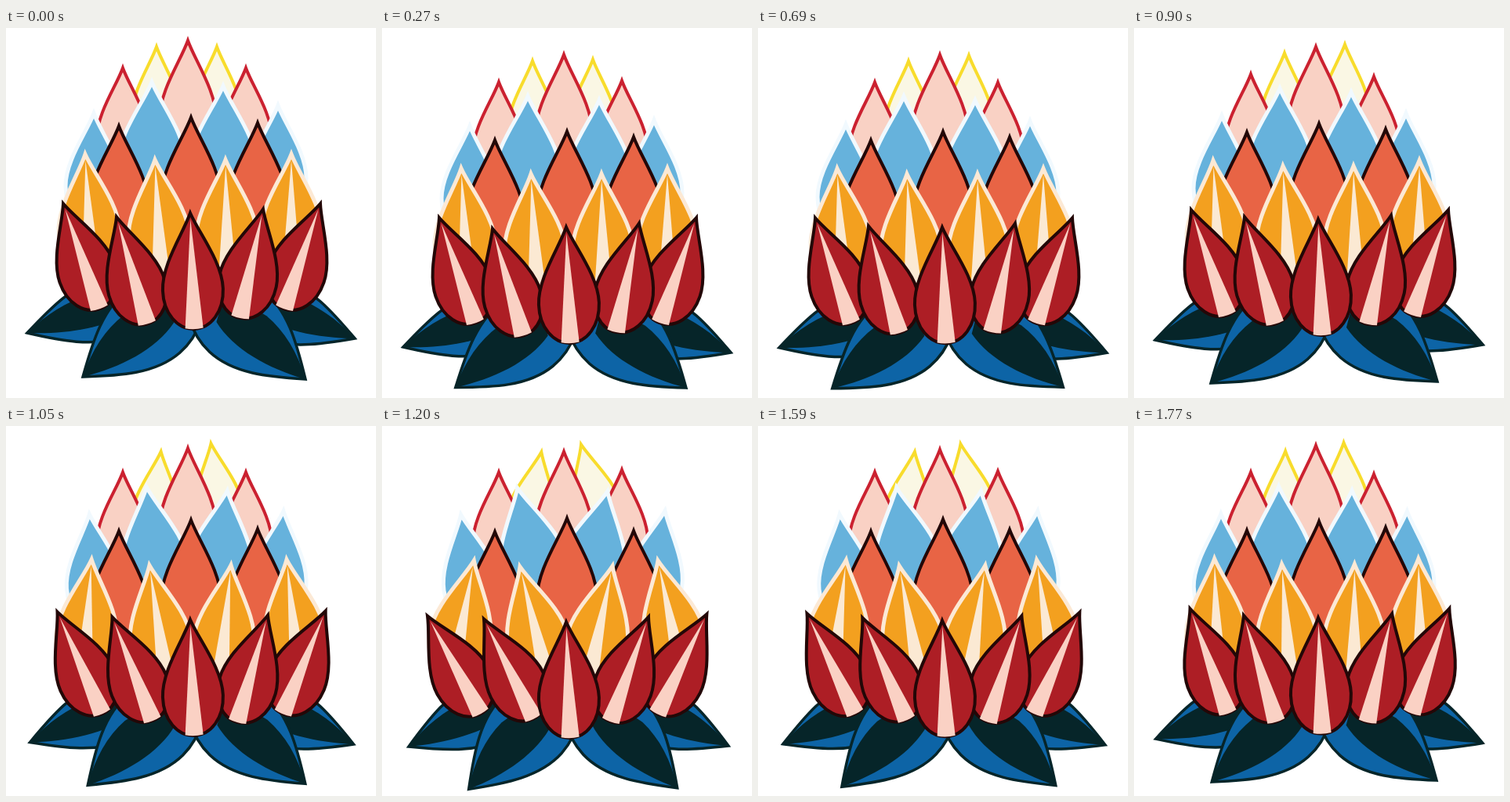
Animation of 472 by 472 pixels, one loop 1.8 s. Source, as an HTML page with a canvas:

```html
<!DOCTYPE html>
<html lang="en">
<head>
<meta charset="utf-8">
<title>Opening flower</title>
<style>
  html, body { margin: 0; width: 100%; height: 100%; overflow: hidden; background: #fff; }
  canvas { display: block; width: 100vw; height: 100vh; }
</style>
</head>
<body>
<canvas id="stage" width="472" height="472"></canvas>
<script>
const ctx = document.getElementById('stage').getContext('2d');
const LOOP = 1800, STEP = 30, LEG = 450;
const DARK = '#062529', BLUE = '#0d64a6', INK = '#230707';

// Poses are [x, y, lean]: raised, sunk, resting, open.
// By default a part sinks 30 px and comes to rest 8 px below its start.
const poses = (x, y, lean, openX, openY, openLean, sink = 30, rest = 8) => [
  [x, y, lean], [x, y + sink, lean], [x, y + rest, lean], [openX, openY, openLean]
];

const leaves = [
  { wide: 0.78, side: 1, keys: poses(27, 389, 17, 37.5, 414.5, 27.5, 30, 9) },
  { wide: 0.78, side: -1, keys: poses(445, 396, 20, 440.5, 410, 25) },
  { wide: 1, side: 1, keys: [[98, 445, 38], [91, 467.5, 35.5], [98, 453, 38], [117, 468.5, 49]] },
  { wide: 1, side: -1, keys: [[382, 448, 40], [392, 466.5, 37], [387, 451, 38], [371.5, 467, 46.5]] }
];

const row = (fill, line, weight, w, l, petals, shine) =>
  ({ fill, line, weight, w, l, shine, petals });

const rows = [
  row('#faf7e4', '#f8dc2c', 4, 31, 130, [
    poses(192, 24, 0, 209, 34, -14),
    poses(269, 24, 0, 246.5, 25, 21, 27, -3)
  ]),
  row('#f9d1c4', '#cb2130', 4, 33, 135, [
    poses(149, 51, 0, 149, 59, 0),
    poses(306, 51, 0, 306, 53, 0, 27, 11)
  ]),
  row('#f9d1c4', '#cb2130', 4, 36, 150, [
    poses(232, 16, 0, 232, 37, 0)
  ]),
  row('#66b2dc', '#f1f9fe', 5, 36, 140, [
    poses(112, 109, 0, 95, 114, 13, 27, 3),
    poses(347, 99, 0, 368, 108, -13, 31, 10)
  ]),
  row('#66b2dc', '#f1f9fe', 5, 43, 155, [
    poses(186, 69, 0, 166, 80, 18),
    poses(277, 74, 0, 293, 84, -17)
  ]),
  row('#e86445', INK, 4, 38, 153, [
    poses(144, 125, 0, 144, 136, 0),
    poses(321, 121, 0, 321, 136, 0),
    poses(236, 114, 0, 236, 115.5, 0)
  ]),
  row('#f3a01f', '#fce9d5', 5, 39, 150, [
    poses(101, 161, 3, 125.5, 173, -17),
    poses(364, 161, 0, 346, 173, 18),
    poses(190, 168, 3, 169, 181, 19),
    poses(280, 168, 1, 301, 180, -18)
  ], '#fbe9d3'),
  row('#ad1e25', INK, 4, 37, 142, [
    poses(73, 224, 19, 50.5, 247.5, 33.5),
    poses(401, 224, -19, 421, 244, -30),
    poses(141, 241, 16, 124.5, 249, 32, 25, 0),
    poses(328, 231, -12, 346, 246, -24)
  ], '#fad1c4'),
  row('#ad1e25', INK, 4, 38.5, 148, [
    poses(235, 236, 2, 235, 253, 2)
  ], '#fad1c4')
];

function poseAt(keys, t) {
  const leg = Math.floor(t / LEG), k = t / LEG - leg;
  const from = keys[leg], to = keys[leg === 3 ? 2 : leg + 1];
  return from.map((v, i) => v + (to[i] - v) * k);
}

function place([x, y, lean], side = 1) {
  ctx.save();
  ctx.translate(x, y);
  ctx.scale(side, 1);
  ctx.rotate(-lean * Math.PI / 180);
}

function drawLeaf({ wide, side, keys }, t) {
  place(poseAt(keys, t), side);
  ctx.save();
  ctx.scale(1, wide);
  const body = new Path2D(
    'M0 0C38-28 75-54 116-52C150-50 180-30 190 0C180 30 150 50 116 52C75 54 38 28 0 0Z');
  ctx.fillStyle = BLUE;
  ctx.fill(body);
  ctx.fillStyle = DARK;
  ctx.fill(new Path2D('M0 0C30-20 60-30 90-30L150-20L134 17C95 30 45 20 0 0Z'));
  ctx.restore();
  const outline = new Path2D();
  outline.addPath(body, { a: 1, b: 0, c: 0, d: wide, e: 0, f: 0 });
  ctx.lineWidth = 3.5;
  ctx.strokeStyle = DARK;
  ctx.stroke(outline);
  ctx.restore();
}

function petalPath(w, l) {
  ctx.beginPath();
  ctx.moveTo(0, 0);
  ctx.bezierCurveTo(0.25 * w, 0.17 * l, w, 0.43 * l, w, 0.66 * l);
  ctx.bezierCurveTo(w, 0.86 * l, 0.55 * w, l, 0, l);
  ctx.bezierCurveTo(-0.55 * w, l, -w, 0.86 * l, -w, 0.66 * l);
  ctx.bezierCurveTo(-w, 0.43 * l, -0.25 * w, 0.17 * l, 0, 0);
  ctx.closePath();
}

function drawPetal({ fill, line, weight, w, l, shine }, keys, t) {
  place(poseAt(keys, t));
  petalPath(w, l);
  ctx.fillStyle = fill;
  ctx.fill();
  ctx.strokeStyle = line;
  ctx.lineWidth = weight;
  ctx.stroke();
  if (shine) {
    ctx.beginPath();
    ctx.moveTo(0, 8);
    ctx.lineTo(11.5, l - 1);
    ctx.quadraticCurveTo(0, l + 1.5, -11.5, l - 1);
    ctx.fillStyle = shine;
    ctx.fill();
  }
  ctx.restore();
}

function draw(t) {
  ctx.fillStyle = '#fff';
  ctx.fillRect(0, 0, 472, 472);
  leaves.forEach(leaf => drawLeaf(leaf, t));
  rows.forEach(r => r.petals.forEach(keys => drawPetal(r, keys, t)));
}

const start = performance.now();
function tick() {
  const t = (performance.now() - start) % LOOP;
  draw(Math.floor(t / STEP) * STEP);
  requestAnimationFrame(tick);
}
tick();
</script>
</body>
</html>
```
